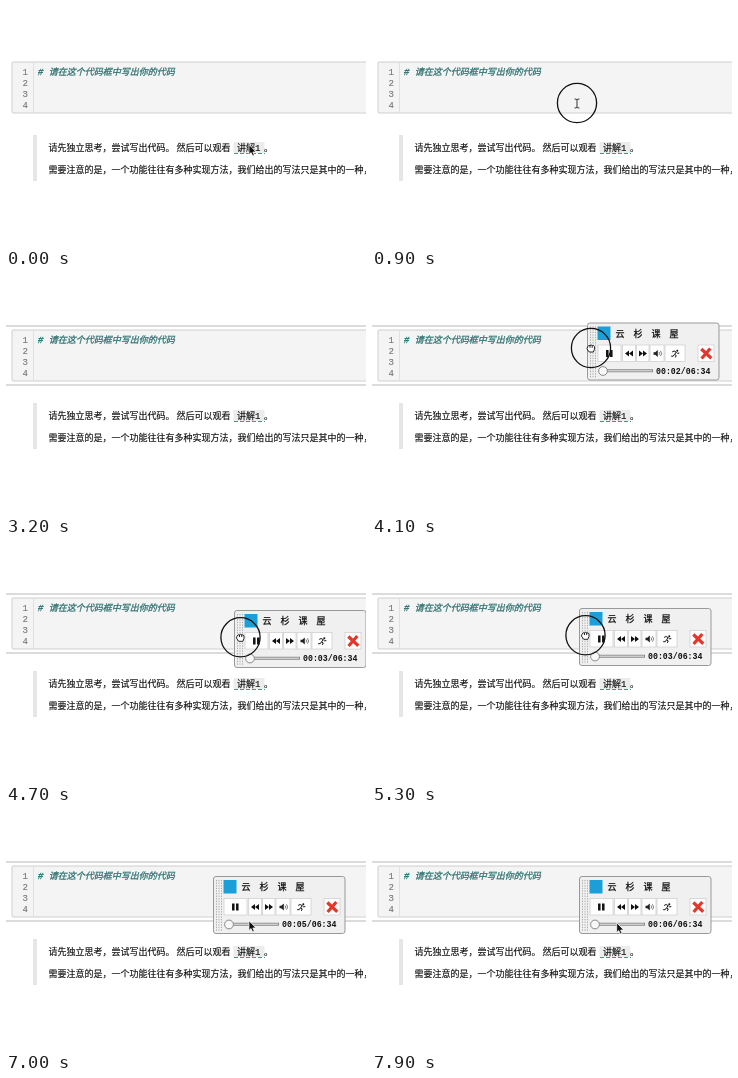
An HTML page for the animation above (8 s loop, 360 by 240 pixels).

```html
<!DOCTYPE html>
<html lang="zh-CN">
<head>
<meta charset="utf-8">
<title>Notebook audio player</title>
<style>
html, body { margin: 0; width: 100%; height: 100%; overflow: hidden; background: #fff; }
svg { display: block; width: 360px; height: 240px; }
text {
  font: 9px "Noto Sans CJK SC", "Noto Sans CJK", "Noto Sans", sans-serif;
  white-space: pre; fill: #111; stroke: #111; stroke-width: .15;
}
.mono { font-family: "Liberation Mono", "Noto Sans CJK SC", "Noto Sans CJK", monospace; }
.comment { font-style: italic; fill: #327474; stroke: #327474; stroke-width: .3; }
.numbers text { fill: #777; stroke: #777; text-anchor: end; }
.title { letter-spacing: 9px; stroke-width: .25; }
.clock { font-size: 8.25px; font-weight: 700; stroke: none; }
.button { fill: #fefefe; stroke: #ccc; stroke-width: .7; }
.cursor path { stroke-linejoin: round; stroke-linecap: round; }
</style>
</head>
<body>
<svg viewBox="0 0 360 240">
  <!-- code cell -->
  <g id="selection" fill="none"><path d="M0 52H360M0 111H360"/></g>
  <rect x="6" y="56" width="370" height="51" rx="1" fill="#f4f4f4" stroke="#cfcfcf"/>
  <path d="M27.5 56.5V106.5" stroke="#e0e0e0"/>
  <g class="numbers" id="numbers"></g>
  <text class="comment mono" x="32" y="69"># 请在这个代码框中写出你的代码</text>
  <path id="caret" d="M32.5 93.5V104" stroke="#111"/>

  <!-- instructions -->
  <rect x="27" y="129" width="4" height="46" fill="#e6e6e6"/>
  <text x="42.5" y="145">请先独立思考，尝试写出代码。 然后可以观看</text>
  <rect x="227.5" y="136" width="31" height="11" rx="1" fill="#ececec"/>
  <path d="M228 147.5H259" stroke="#4f9676" stroke-dasharray="4 2"/>
  <text class="mono" x="231" y="145">讲解1</text>
  <text x="258" y="145">。</text>
  <text x="42.5" y="166.5">需要注意的是，一个功能往往有多种实现方法，我们给出的写法只是其中的一种，</text>

  <!-- audio player -->
  <g id="player">
    <rect x=".5" y=".5" width="131.5" height="57" rx="2.5" fill="#f0f0f0" stroke="#999"/>
    <path d="M3.5 4V55M6 4V55M8.5 4V55" stroke="#aaa" stroke-dasharray="1.3 1.3"/>
    <rect x="10.5" y="4" width="13" height="13.5" fill="#1b9fd8"/>
    <text class="title mono" x="28.5" y="14">云杉课屋</text>
    <g id="buttons"></g>
    <path d="M20.3 27.5V34.5M24.3 27.5V34.5" stroke="#111" stroke-width="2.5"/>
    <path d="M42 28v6l-4-3zM46 28v6l-4-3zM52 28v6l4-3zM56 28v6l4-3z" fill="#111"/>
    <path d="M66.5 29.8h1.7l2.6-2.3v7l-2.6-2.3h-1.7z" fill="#222"/>
    <path d="M72 29.5q1.3 1.5 0 3M73.5 28.3q2.2 2.7 0 5.4" fill="none" stroke="#444" stroke-width=".7"/>
    <circle cx="90.3" cy="28.2" r="1" fill="#111"/>
    <path d="M85.2 29.4l2-.9 2 1.2-1.6 2.2 1.6 1-.8 2M87.4 32l-1.2 1.7h-2M89.5 29.9l1.2 1 1.6-.4" fill="none" stroke="#111" stroke-width="1"/>
    <path d="M114.3 26.5L124.3 35.7M123.3 26L114.6 36" stroke="#e3372c" stroke-width="3.2"/>
    <path d="M15 48.3H66" stroke="#888" stroke-width="3"/>
    <path d="M16 48.3H65" stroke="#ccc" stroke-width="1.4"/>
    <circle cx="16" cy="48.5" r="4.4" fill="#f8f8f8" stroke="#888"/>
    <text class="clock mono" id="clock" x="69" y="51"></text>
  </g>

  <!-- pointer, origin at its hot spot -->
  <g id="cursor" class="cursor">
    <circle id="press" r="19.6" fill="none" stroke="#111" stroke-width="1.3"/>
    <path id="arrow" d="M0 0V9.6L2.1 7.6 3.7 11 5.3 10.3 3.9 7H6.8z" fill="#111" stroke="#fff" stroke-width=".7"/>
    <path id="ibeam" d="M-2-4Q0-4 0-3 0-4 2-4M0-3V4M-2 5Q0 5 0 4 0 5 2 5" fill="none" stroke="#333"/>
    <path id="hand" d="M-1 .8Q0-.6 1 .8V4.2L6 5.3 6.6 7 5.2 11H.2L-3.5 6.6-2.8 5.6-1 6.6z" fill="#fff" stroke="#111" stroke-width="1"/>
    <path id="grab" d="M-3.3-1.4Q-2.4-3.2-1-2.5 .3-3.5 1.3-2.4 2.8-3 3.5-1.3V1L2.4 4H-1.8L-3.8 1.2zM-1-2V-.6M1.2-2V-.6" fill="#fff" stroke="#111" stroke-width=".9"/>
  </g>
</svg>
<script>
const $ = id => document.getElementById(id);
const LOOP = 8000, STEP = 100;

$("numbers").innerHTML = [1, 2, 3, 4]
  .map(n => `<text class="mono" x="22" y="${58 + 11 * n}">${n}</text>`).join("");

// Left edge and width of each button
$("buttons").innerHTML = [[11, 23], [35.5, 13], [49.5, 12.5], [63, 14], [78, 20], [111, 16]]
  .map(([x, w]) => `<rect class="button" x="${x}" y="22.5" width="${w}" height="16.5"/>`).join("");
const pauseButton = $("buttons").firstChild;

// Keys are [time, x, y]
const pointerPath = [
  [0, 243, 139], [100, 243, 139], [700, 205, 97], [1000, 205, 97], [1500, 240.5, 141.5],
  [3800, 240.5, 141.5], [3900, 219, 74], [4100, 219, 74], [4700, 234.5, 95.3], [4800, 234.5, 95.3],
  [5300, 213.5, 93.3], [5600, 213.5, 93.3], [6200, 238, 105], [6600, 238, 105], [7200, 244.7, 113]
];
const playerPath = [
  [3900, 215, 48.5], [4100, 215, 48.5], [4700, 228, 68], [4800, 228, 68], [5300, 207, 66]
];
const shapes = [
  [0, "arrow"], [300, "ibeam"], [1300, "arrow"], [1500, "hand"], [3200, ""],
  [3900, "grab"], [5600, "arrow"], [5900, "hand"], [6800, "arrow"]
];

function position(path, t) {
  const i = path.findIndex(key => key[0] > t);
  if (i < 0) return path.at(-1).slice(1);
  if (i === 0) return path[0].slice(1);
  const [a, b] = [path[i - 1], path[i]];
  const p = (t - a[0]) / (b[0] - a[0]);
  const eased = p * p * (3 - 2 * p);
  return [1, 2].map(k => a[k] + (b[k] - a[k]) * eased);
}

const within = (t, from, to) => t >= from && t < to;
const show = (id, visible) => $(id).setAttribute("display", visible ? "inline" : "none");
const place = (id, path, t) => $(id).setAttribute("transform", `translate(${position(path, t)})`);

function draw(t) {
  const editing = within(t, 1000, 3100);
  show("selection", t >= 1000);
  $("selection").setAttribute("stroke", editing ? "#9bd09e" : "#b8b8b8");
  show("caret", editing && Math.floor((t - 1000) / 530) % 2 === 0);

  show("player", t >= 3900);
  place("player", playerPath, t);
  const seconds = Math.max(0, Math.floor((t - 1500) / 1000));
  $("clock").textContent = `00:0${seconds}/06:34`;
  pauseButton.style.fill = within(t, 5900, 6800) ? "#d9d9d9" : "";

  const shape = shapes.findLast(([start]) => start <= t)[1];
  show("cursor", shape);
  for (const id of ["arrow", "ibeam", "hand", "grab"]) show(id, id === shape);
  show("press", within(t, 900, 1100) || within(t, 3000, 3200) || within(t, 3900, 5500));
  place("cursor", pointerPath, t);
}

function frame() {
  draw(Math.floor(performance.now() % LOOP / STEP) * STEP);
  requestAnimationFrame(frame);
}
frame();
</script>
</body>
</html>
```
